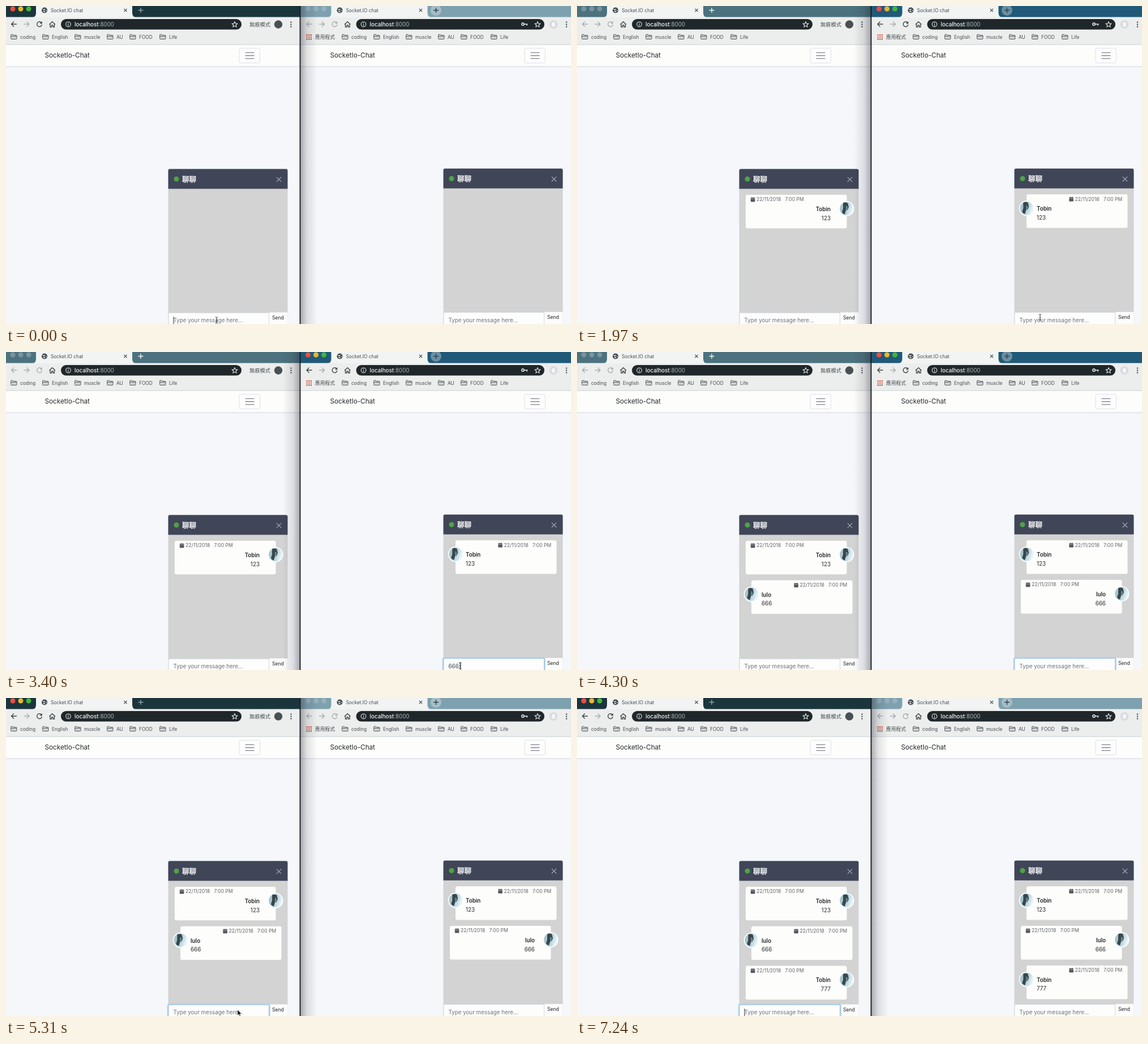
Write an HTML page that moves like this. It is 998 px wide and 561 px high and loops after 7.27 s.

```html
<!DOCTYPE html>
<html lang="en">
<head>
<meta charset="utf-8">
<title>Socket.IO chat</title>
<style>
html, body { margin: 0; height: 100%; overflow: hidden; background: #f5f7fa; }
svg { display: block; width: 998px; height: 561px; }
text { font-family: Inter, "Noto Sans CJK TC", "Noto Sans CJK JP", "Noto Sans CJK", sans-serif; white-space: pre; }
</style>
</head>
<body>
<svg id="stage" viewBox="0 0 998 561"></svg>
<script>
const LOOP = 7270;
const stage = document.getElementById('stage');

// start time, active window, input focused, typed text, messages sent
const steps = [
  [0, 0, 1, '', 0], [330, 0, 1, '1', 0], [460, 0, 1, '12', 0], [590, 0, 1, '123', 0],
  [800, 0, 1, '', 1], [1700, 1, 0, '', 1], [2210, 1, 1, '', 1], [2650, 1, 1, '6', 1],
  [2850, 1, 1, '66', 1], [3050, 1, 1, '666', 1], [3700, 1, 1, '', 2], [4780, 0, 1, '', 2],
  [5950, 0, 1, '7', 2], [6130, 0, 1, '77', 2], [6310, 0, 1, '777', 2], [6850, 0, 1, '', 3]
];

// start, end, from x,y, to x,y, pointer shape
const moves = [
  [0, 250, 372, 554, 372, 554, 'beam'],
  [1480, 1850, 372, 554, 818, 549, 'arrow'],
  [1850, 2080, 818, 549, 818, 549, 'beam'],
  [2080, 2250, 818, 549, 802, 553, 'beam'],
  [2250, 3700, 802, 553, 802, 553, 'beam'],
  [4450, 5050, 802, 553, 409, 551, 'arrow'],
  [5050, 5700, 409, 551, 409, 551, 'arrow']
];

const messages = [[0, 'Tobin', '123'], [1, 'lulo', '666'], [0, 'Tobin', '777']];

const rect = (x, y, w, h, fill, r = 0, more = '') =>
  `<rect x="${x}" y="${y}" width="${w}" height="${h}" rx="${r}" fill="${fill}" ${more}/>`;
const dot = (x, y, r, fill, more = '') => `<circle cx="${x}" cy="${y}" r="${r}" fill="${fill}" ${more}/>`;
const line = (d, color, w = 1.2, more = '') =>
  `<path d="${d}" fill="none" stroke="${color}" stroke-width="${w}" ${more}/>`;
const text = (x, y, size, fill, s, more = '') =>
  `<text x="${x}" y="${y}" font-size="${size}" fill="${fill}" ${more}>${s}</text>`;
const at = (x, y, s) => `<g transform="translate(${x} ${y})">${s}</g>`;
const cross = (x, y, r, color, w) =>
  line(`M${x - r} ${y - r}l${2 * r} ${2 * r}m0 ${-2 * r}l${-2 * r} ${2 * r}`, color, w);
const plus = (x, y, color) => line(`M${x - 4.5} ${y}h9m-4.5-4.5v9`, color, 1.4);
const END = 'text-anchor="end"';

const shade = '<stop stop-color="#223" stop-opacity=".36"/><stop offset=".4" stop-color="#223" stop-opacity=".12"/><stop offset="1" stop-color="#223" stop-opacity="0"/>';
const defs = `<defs>
  <linearGradient id="fadeR">${shade}</linearGradient>
  <linearGradient id="fadeL" x1="1" x2="0">${shade}</linearGradient>
  <linearGradient id="sky" x2="1" y2=".3"><stop stop-color="#a9c1c6"/><stop offset=".55" stop-color="#a8cbd8"/><stop offset="1" stop-color="#e9f3f5"/></linearGradient>
  <clipPath id="left"><rect width="519" height="561"/></clipPath>
</defs>`;

const globe = dot(0, 0, 5, '#3c4448') +
  line('M-3.5-2l2.500 1.500l2-2M-2.500 2.500l2-1l1.500 2M2 0l2 1', '#f4f6f5', 1.3);

const folder = `<path d="M.6 1.500q0-1 1-1h2.800l1.200 1.300h4.400q1 0 1 1v5q0 1-1 1h-8.400q-1 0-1-1zM.6 3.600h10.400" fill="#d0d2d2" stroke="#585d60" stroke-width="1"/>`;

const calendar = rect(0, 1, 7.6, 7.2, '#54565c', 1) +
  line('M2.200 0v2M5.400 0v2', '#54565c', 1.2) + line('M0 3h7.600', '#d5d5d8', .6);

const avatar = dot(0, 0, 13.6, '#fafcfc') + dot(0, 0, 11.8, 'url(#sky)') +
  '<path d="M-6-10Q-2-12 2-10L4-3L2 2L-1 3L-3 10Q-7 9-8 6L-6 0Z" fill="#38474c"/>' +
  '<path d="M-1-5l3 1l0 5l-3 2z" fill="#6d8992"/>';

function chrome(side, active) {
  const x0 = side ? 520 : 0, width = side ? 478 : 519, dx = side ? 521.5 : 0;
  const strip = side ? (active ? '#205a78' : '#7ea1af') : (active ? '#1b353d' : '#4b727e');
  const dim = side ? '#95b1bd' : '#7794a0';
  const lights = active ? ['#ea4f43', '#e8b62f', '#42b43d'] : [dim, dim, dim];
  const ink = '#3d4245', pale = '#a9adaf', nav = active ? ink : pale;
  let s = rect(x0, 0, width, 20, strip) + rect(x0, 19.5, width, 49, '#eceeed');

  let top = lights.map((c, i) => dot(12 + i * 14, 5, 4.5, c)).join('');
  top += '<path d="M47 20q6-1 6-8V0H223v12q0 7 6 8z" fill="#f1f4f2"/>';
  top += at(68, 7.5, globe) + text(79, 10.6, 8.3, '#464b4e', 'Socket.IO chat') + cross(211, 7.5, 2.6, ink, 1.2);
  if (side) top += dot(238, 7.5, 9.5, active ? '#6a8fa2' : '#a5bec8');
  top += plus(238, 7.5, side ? '#2f4048' : (active ? '#91a4aa' : '#f4f8f8'));

  top += line('M19 32h-9.500m4.500-4.500l-4.500 4.500l4.500 4.500', nav, 1.4);
  top += line('M31.500 32h9.500m-4.500-4.500l4.500 4.500l-4.500 4.500', pale, 1.4);
  top += line('M62.600 29.500a4.400 4.400 0 1 0 .8 3.400', nav, 1.4) + `<path d="M63.800 27v4.300h-4.300z" fill="${nav}"/>`;
  top += line('M76.500 32.500l5.200-4.800l5.200 4.800M78 31.500v5.500h2.500v-3h2.500v3h2.500v-5.500', ink, 1.3);
  s += at(dx, 0, top);

  const px = 97 + dx, pr = side ? 951 : 416;
  s += rect(px, 23, pr - px, 18.6, '#20272a', 9.3);
  s += dot(px + 13, 32.3, 4.3, 'none', 'stroke="#e5e8e8" stroke-width="1.1"') +
    line(`M${px + 13} 32v2.800m0-5v1.200`, '#e5e8e8');
  s += text(px + 24, 35.6, 9.8, '#f3f5f5',
    '<tspan font-weight="500">localhost</tspan><tspan fill="#adb4b6">:8000</tspan>');
  s += at(pr - 12, 32.5,
    line('M0-4.800l1.400 3.200l3.400.3l-2.600 2.300l.8 3.400l-3-1.800l-3 1.800l.8-3.400l-2.600-2.300l3.400-.3z', '#dfe3e3', 1.1));
  if (side) {
    s += dot(913, 32, 2.1, 'none', 'stroke="#dfe3e3" stroke-width="1.6"') + line('M915 32h6.500m-1.500 0v2.500', '#dfe3e3', 1.6);
    s += dot(967, 32.5, 7.5, '#d9dce0') + rect(964.5, 28.5, 5, 8, '#f8f9f9', 2);
  } else {
    s += text(430, 36, 9.25, '#484d50', '無痕模式') + dot(481, 32.5, 7.2, '#494f52');
  }
  for (const y of [28.5, 32.5, 36.5]) s += dot(side ? 990 : 503.5, y, 1.2, '#4a5053');

  const bx = side ? 585 : 0;
  [[8, 'coding'], [64, 'English'], [121, 'muscle'], [178, 'AU'], [218, 'FOOD'], [271, 'Life']].forEach(([x, label]) => {
    s += at(x + bx, 49.7, folder) + text(x + bx + 17, 57.6, 8.4, '#464b4e', label);
  });
  if (side) {
    for (let i = 0; i < 9; i++)
      s += rect(530.5 + i % 3 * 3.6, 50 + (i / 3 | 0) * 3.6, 2.3, 2.3, ['#d9544b', '#db6a4c', '#a35a50'][i / 3 | 0]);
    s += text(546, 57.8, 8.75, '#464b4e', '應用程式');
  }
  return s;
}

function page(side) {
  const x0 = side ? 520 : 0, width = side ? 478 : 519;
  return rect(x0, 68, width, 493, '#f5f7fa') + rect(x0, 68, width, 38.5, '#fdfdfb') +
    rect(x0, 106, width, 1.2, '#dcdfe6') + rect(x0, 107.2, width, 1.8, '#eff1f6') +
    at(side ? 504 : 0, 0,
      text(68.6, 91, 11.7, '#26282b', 'SocketIo-Chat') +
      rect(412, 74.5, 36.5, 26, '#fdfdfd', 3, 'stroke="#dfe0ea"') +
      line('M422.500 82.300h16m-16 5.200h16m-16 5.200h16', '#83848e', 1.3));
}

function message(i, side, late) {
  const [author, name, body] = messages[i];
  const mine = author === side, x = mine ? 298 : 308, y = 333 + i * 69.8;
  const hasIcon = !mine || late;
  const date = mine ? (hasIcon ? 317 : 316) : 393.5, tx = mine ? 448 : 326, anchor = mine ? END : '';
  return rect(x, y, 178.5, 59.3, '#fdfdfb', 3) +
    (hasIcon ? at(date - 10.2, y + 4.2, calendar) : '') +
    text(date, y + 11.4, 8.65, '#606268', '22/11/2018') +
    text(date + 83.6, y + 11.4, 8.5, '#606268', '7:00 PM', END) +
    text(tx, y + 28.8, 9.8, '#222529', name, anchor + ' font-weight="600"') +
    text(tx, y + 44.5, 9.9, '#2a2d31', body, anchor) +
    at(mine ? 476 : 308.3, y + 24.5, avatar);
}

function chat(side, count, focused, typed, glow, caret, late) {
  let s = rect(286.5, 322, 211, 240, '#d3d3d3');
  s += '<path d="M286.500 322.500V290.500q0-3 3-3H494.500q3 0 3 3v32z" fill="#404658"/>';
  s += dot(301, 305.2, 4.5, '#4fa345') + text(311, 309.5, 12.6, '#fbfbfc', '聊聊', 'font-weight="700"');
  s += cross(482, 306, 4.2, '#a9adbb', 1.1);
  for (let i = 0; i < count; i++) s += message(i, side, late);
  s += rect(465, 540.5, 32.5, 22, '#fcfcfc');
  if (glow) s += rect(286, 540, 179.5, 40, 'none', 3, 'stroke="#b3d2ea" stroke-width="2.6"');
  s += rect(287, 541.2, 177.5, 40, '#fdfdfd', 2, `stroke="${glow ? '#9fc4e0' : '#d3d8dc'}"`);
  s += text(295.5, 558.4, 9.8, typed ? '#3f4549' : '#6d747b', typed || 'Type your message here...');
  s += text(470, 552.8, 8.6, '#202224', 'Send');
  if (focused && caret) s += rect(295.5 + typed.length * 7, 548, 1, 14, '#26292c');
  return at(side ? 486 : 0, side ? -.7 : 0, s);
}

function pointer(t) {
  const move = moves.find(m => t >= m[0] && t < m[1]);
  if (!move) return '';
  const [a, b, x, y, x2, y2, shape] = move;
  const k = (t - a) / (b - a), e = k * k * (3 - 2 * k);
  const icon = shape === 'beam'
    ? line('M-2.300-5.200q2.300 0 2.300 1.500v7.800q0 1.500-2.300 1.500M2.300-5.200q-2.300 0-2.300 1.500m0 7.800q0 1.500 2.300 1.500M-1.200.6h2.400', '#3c4043', 1)
    : '<path d="M0-1v10l2.300-2.100l1.500 3.500l1.600-.7l-1.500-3.400h3.200z" fill="#111" stroke="#fff" stroke-width=".6"/>';
  return at(x + (x2 - x) * e, y + (y2 - y) * e, icon);
}

function scene(t) {
  const [since, active, focused, typed, count] = steps.filter(s => s[0] <= t).pop();
  const caret = Math.floor((t - since) / 500) % 2 === 0;
  const late = t >= 1500;
  const view = side => {
    const here = side === active && focused;
    return page(side) + chrome(side, side === active) + rect(side ? 520 : 0, 67.5, 519, 1, '#d0d3d5') +
      chat(side, count, here, here ? typed : '', here && t > 120, caret, late);
  };
  return defs + `<g clip-path="url(#left)">${view(0)}</g>` + view(1) +
    (active ? rect(489, 0, 30, 561, 'url(#fadeL)') : rect(520, 0, 30, 561, 'url(#fadeR)')) +
    rect(518.6, 0, 1.8, 561, '#15191c') + pointer(t);
}

let shown = '';
function tick(now) {
  const next = scene(now % LOOP);
  if (next !== shown) stage.innerHTML = shown = next;
  requestAnimationFrame(tick);
}
tick(performance.now());
</script>
</body>
</html>
```
